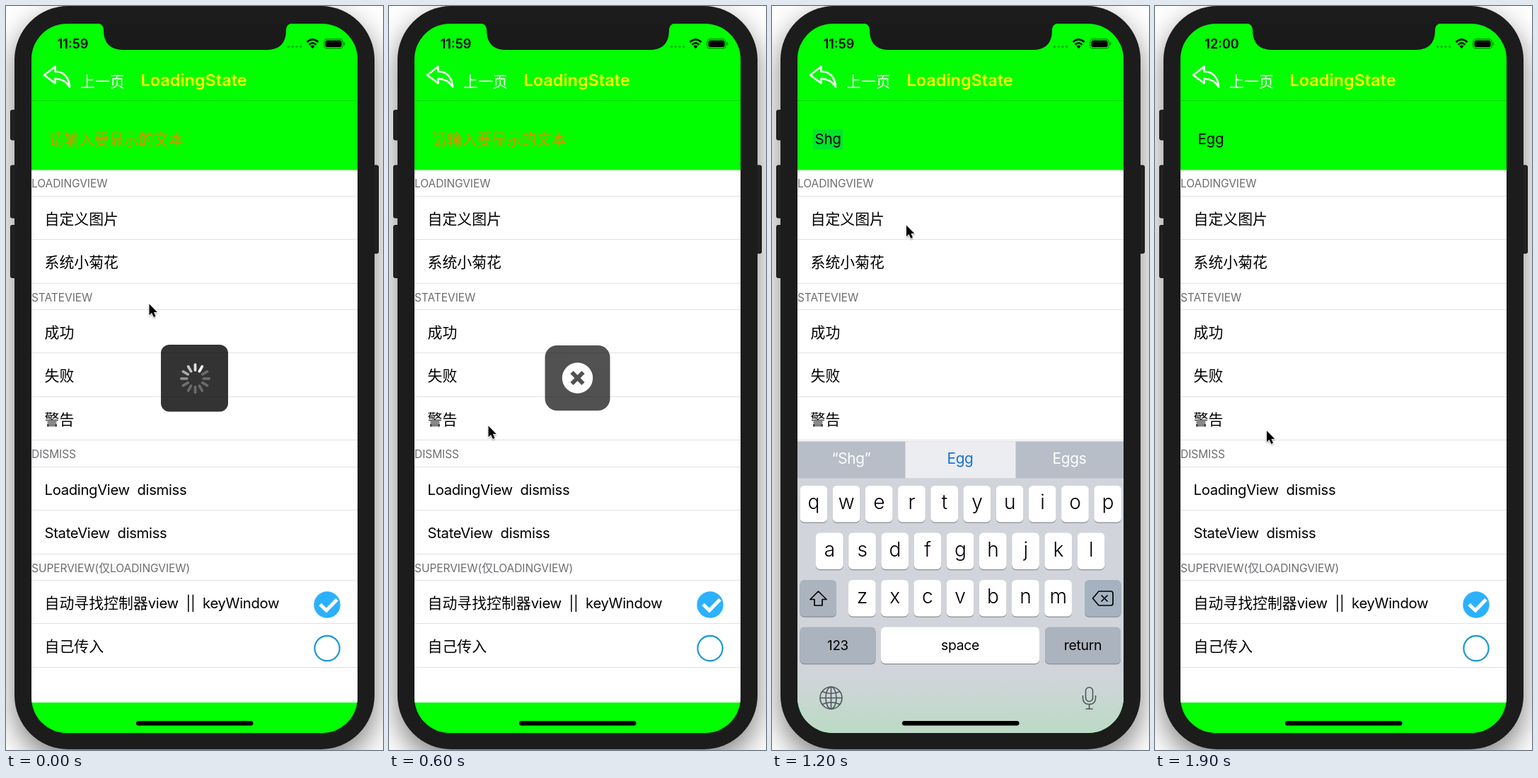
These frames come from a looping animation (533 px wide and 1050 px high, 2000 ms). An HTML page:

```html
<!DOCTYPE html>
<html lang="zh">
<head>
<meta charset="utf-8">
<style>
html, body { margin: 0; width: 100%; height: 100%; overflow: hidden; background: #fff; }
svg { display: block; width: 533px; height: 1050px; }
text { font-family: Inter, "Noto Sans CJK SC", "Noto Sans CJK", sans-serif; white-space: pre; }
.latin { font-size: .97em; letter-spacing: var(--ls, -.016em); }
</style>
</head>
<body>
<svg viewBox="0 0 533 1050">
  <defs>
    <filter id="shade" x="-20%" y="-10%" width="140%" height="120%">
      <feDropShadow dx="0" dy="16" stdDeviation="20" flood-opacity=".5"/>
    </filter>
    <filter id="soft" x="-50%" y="-50%" width="200%" height="200%">
      <feDropShadow dx="0" dy="1.5" stdDeviation="1.2" flood-opacity=".4"/>
    </filter>
    <linearGradient id="board" x1="0" y1="0" x2="0" y2="1">
      <stop offset=".8" stop-color="#d1d5db"/>
      <stop offset=".96" stop-color="#bfd9c9"/>
    </linearGradient>
    <clipPath id="screen"><rect x="36" y="25" width="461" height="1001" rx="50"/></clipPath>
  </defs>
  <g fill="#2b2b2b" stroke="#111">
    <rect x="6.5" y="147" width="12" height="42" rx="2"/>
    <rect x="6.5" y="225" width="12" height="74" rx="2"/>
    <rect x="6.5" y="309.500" width="12" height="74" rx="2"/>
    <rect x="514" y="225" width="12.500" height="124" rx="2"/>
  </g>
  <rect x="12" y="0" width="509" height="1049" rx="76" fill="#1a1a1a" filter="url(#shade)"/>
  <g clip-path="url(#screen)">
    <rect x="36" y="25" width="461" height="1001" fill="#01fe01"/>
    <rect x="36" y="231.500" width="461" height="751.500" fill="#fff"/>
    <path d="M36 133.500H497" stroke="#00d800"/>
    <g id="page"></g>
    <g id="field"></g>
    <g id="keyboard"></g>
    <g id="hud"></g>
    <rect x="184" y="1009" width="165.500" height="6.500" rx="3.200"/>
    <path d="M128 24Q138 25 138 34Q138 62 166 62H368Q396 62 396 34Q396 25 406 24Z" fill="#1a1a1a"/>
  </g>
  <path id="cursor" d="M0 0V17.500L4 13.800L7 20.500L10 19.200L7.200 12.700H12.500Z" stroke="#fff" stroke-width="1.300" paint-order="stroke" filter="url(#soft)"/>
</svg>
<script>
const $ = id => document.getElementById(id);
const text = (x, y, str, size = 20.9, attrs = '') =>
  `<text x="${x}" y="${y}" font-size="${size}" ${attrs}>` +
  str.replace(/[ -~“”]+/g, run => `<tspan class="latin">${run}</tspan>`) + '</text>';
const mid = 'text-anchor="middle" ';
const rect = (x, y, w, h, r, fill) =>
  `<rect x="${x}" y="${y}" width="${w}" height="${h}" rx="${r}" fill="${fill}"/>`;
const line = (d, stroke, width, extra = '') =>
  `<path d="${d}" fill="none" stroke="${stroke}" stroke-width="${width}" ${extra}/>`;

function drawPage() {
  const sections = [
    ['LOADINGVIEW', '自定义图片', '系统小菊花'],
    ['STATEVIEW', '成功', '失败', '警告'],
    ['DISMISS', 'LoadingView  dismiss', 'StateView  dismiss'],
    ['SUPERVIEW(仅LOADINGVIEW)', '自动寻找控制器view  ||  keyWindow', '自己传入'],
  ];
  let out = '', y = 231.3;
  const rule = () => line(`M36 ${Math.round(y) - .5}H497`, '#e2e2e4', 1);
  for (const [title, ...rows] of sections) {
    out += text(36, y + 25, title, 16, 'fill="#6d6d72" style="--ls:-.004em"');
    y += 37.5;
    out += rule();
    for (const row of rows) {
      out += text(54.5, y + 38.8, row);
      y += 61.4;
      out += rule();
    }
  }
  out += '<circle cx="454" cy="845" r="18.700" fill="#2cb1ff"/>' + line('M444 844.500L453 853L468 837.500', '#fff', 5) +
    '<circle cx="454" cy="906.500" r="17.600" fill="none" stroke="#1b98d4" stroke-width="2.200"/>';

  // navigation and status bars
  out += line('M54 97.500L69.500 85.500V92.500C82 92.500 89 101 90 114C85 106 79 103 69.500 102.500V109Z', '#fff', 2.6, 'stroke-linejoin="round"') +
    text(105, 113.5, '上一页', 20.9, 'fill="#fff"') +
    text(190.5, 113, 'LoadingState', 24.2, 'fill="#ff0" font-weight="600" style="--ls:0"');
  for (let i = 0; i < 4; i++) out += `<circle cx="${399.5 + i * 5.7}" cy="57.500" r="1.700" fill="#00b800"/>`;
  out += line('M425.500 51Q433.500 43.500 441.500 51M428.500 54.500Q433.500 50 438.500 54.500', '#000', 2.6) +
    '<path d="M430.500 56.800Q433.500 54 436.500 56.800L433.500 60Z"/>' +
    '<rect x="449.700" y="46.700" width="26.500" height="13" rx="3.800" fill="none" stroke="#008c00" stroke-width="1.200"/>' +
    rect(451.5, 48.5, 23, 9.5, 2.2, '#000') + rect(477.5, 51, 1.8, 4.5, 1, '#008c00');
  return out;
}

function key(x, y, w, label, size, fill = '#fff') {
  const face = rect(x, y + 1.3, w, 51.5, 6, '#898d93') + rect(x, y, w, 51.5, 6, fill);
  return face + (label ? text(x + w / 2, y + (size > 25 ? 33 : 32.5), label, size,
    mid + (size > 25 ? 'font-weight="350"' : '')) : '');
}

function drawKeyboard(words) {
  const gray = '#abb3be', ink = '#50565c';
  let out = rect(36, 614.5, 461, 412, 0, 'url(#board)') +
    rect(36, 614.5, 461, 52, 0, '#b7bec8') + rect(188.5, 614.5, 156, 52, 0, '#ebedf1');
  words.forEach((word, i) =>
    out += text([112, 266, 420.5][i], 646, word, 21.5, mid + `fill="${i == 1 ? '#1a70d8' : '#fff'}"`));
  ['qwertyuiop', 'asdfghjkl', 'zxcvbnm'].forEach((row, r) =>
    [...row].forEach((ch, i) =>
      out += key([39.5, 62, 108][r] + i * 46.2, 677 + r * 66.5, 38.7, ch, 29)));
  out += key(39.5, 810, 51.5, '', 0, gray) + key(442, 810, 51.5, '', 0, '#a5b3c1') +
    key(39.5, 876.5, 107, '123', 19.5, gray) + key(154, 876.5, 224, 'space', 20) +
    key(386, 876.5, 107, 'return', 20, gray);
  out += line('M65.500 826L77 837.500H71V846H60V837.500H54Z', '#000', 1.7, 'stroke-linejoin="round"') +
    line('M462 826H479Q482 826 482 829V843Q482 846 479 846H462L453.500 836ZM465.500 831.500L474.500 840.500M474.500 831.500L465.500 840.500', '#000', 1.7, 'stroke-linejoin="round"');
  out += `<g fill="none" stroke="${ink}" stroke-width="1.600"><circle cx="83.500" cy="976.500" r="15.500"/>
    <ellipse cx="83.500" cy="976.500" rx="7.500" ry="15.500"/>
    <path d="M83.500 961V992M68 976.500H99M71 967.500Q83.500 973 96 967.500M71 985.500Q83.500 980 96 985.500"/>
    <rect x="443.500" y="961.500" width="10" height="20" rx="5"/>
    <path d="M439.500 973V977Q440 985.500 448.500 985.500Q457 985.500 457.500 977V973M448.500 985.500V992M443.500 992H453.500"/></g>`;
  return out;
}

function drawField(value, selected) {
  if (!value) return text(61, 196, '请输入要显示的文本', 21.1, 'fill="#e78a00"');
  return (selected ? rect(58, 174, 42, 28.5, 0, '#00e52c') : '') + text(60.5, 195, value, 21.3);
}

function spinner(y, lead) {
  let out = '';
  for (let i = 0; i < 12; i++) {
    const age = (lead - i + 24) % 12;
    out += `<path d="M0 -11.800V-19.700" stroke="#fff" stroke-width="3.700" stroke-linecap="round"
      opacity="${Math.max(.27, 1 - age * .14)}" transform="translate(267.500 ${y}) rotate(${i * 30})"/>`;
  }
  return out;
}

const marks = {
  ok: 'M-12 0L-4.500 7L11.500 -8',
  fail: 'M-8 -8L8 8M8 -8L-8 8',
  warn: 'M0 -13V4M0 7.500V13',
};

function drawHud(kind, label, step) {
  if (!kind) return '';
  const spin = kind == 'spin', y = label ? 512 : 525;
  const box = label ? rect(200.5, 464, 131.5, 122, 12, '#000c')
    : spin ? rect(219, 478, 95, 94.5, 12, '#000c') : rect(220.5, 479, 92, 92, 17, '#000c');
  const icon = spin ? spinner(y + .8, (step < 9 ? 1 : 10) + step)
    : `<g transform="translate(266.500 ${y})"><circle r="21.700" fill="#fff"/>${line(marks[kind], '#333', 6)}</g>`;
  return box + icon + (label ? text(266.3, 569.5, label, 20.5, mid + 'fill="#fff" font-weight="500"') : '');
}

// the last entry whose starting step has been reached
const at = (list, step) => list.filter(e => e[0] <= step).pop()[1];
const hudKinds = [[0, 'spin'], [2, 'ok'], [4, 'fail'], [7, 'warn'], [8, ''], [14, 'spin'], [17, 'ok'], [18, 'fail'], [19, '']];
const values = [[0, ''], [11, 'Sh'], [12, 'Shg'], [13, 'Egg']];
const path = [[0, 202.5, 420.5], [3, 165.5, 536.5], [6, 140.5, 592.5], [7, 143, 582], [9, 199.5, 196.5],
  [11, 196, 202], [12, 190, 309.5], [14, 180, 363], [16, 149.5, 473.5], [18, 118, 566], [19, 158, 599.5]];

function cursorAt(step) {
  const n = Math.max(1, path.findIndex(p => p[0] >= step));
  const [a, b] = [path[n - 1], path[n]];
  const k = (step - a[0]) / (b[0] - a[0]);
  return [a[1] + (b[1] - a[1]) * k, a[2] + (b[2] - a[2]) * k];
}

function draw(step) {
  const value = at(values, step), typing = step >= 10 && step < 13;
  $('page').innerHTML = page +
    text(94.5, 59.5, step < 14 ? '11:59' : '12:00', 18.6, mid + 'font-weight="600" style="--ls:0"');
  $('field').innerHTML = drawField(value, step == 12);
  $('keyboard').innerHTML = typing
    ? drawKeyboard(value == 'Shg' ? ['“Shg”', 'Egg', 'Eggs'] : value ? ['“Sh”', 'She', 'Shy'] : ['I', 'The', 'I’m']) : '';
  $('hud').innerHTML = drawHud(at(hudKinds, step), step >= 13 ? value : '', step);
  $('hud').setAttribute('opacity', step == 6 ? .85 : 1);
  $('cursor').setAttribute('transform', `translate(${cursorAt(step)}) scale(.9)`);
}

const page = drawPage();
const start = performance.now();
let shown = -1;
function tick() {
  const step = Math.floor((performance.now() - start) % 2000 / 100);
  if (step != shown) draw(shown = step);
  requestAnimationFrame(tick);
}
tick();
</script>
</body>
</html>
```
